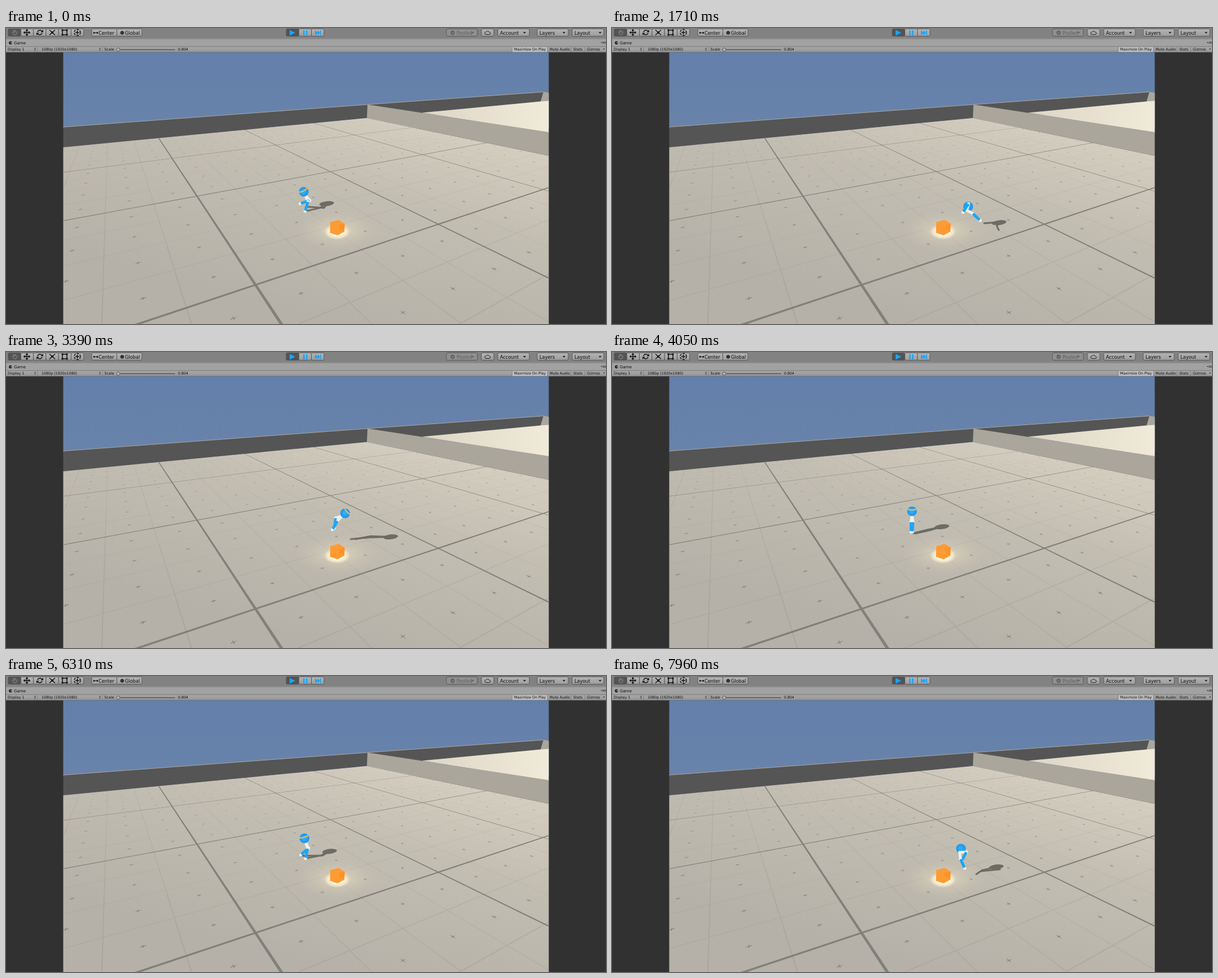
Recreate the animation shown at these times as an HTML page with a canvas. Size 1064 by 526 pixels, loop 8 s.

```html
<!DOCTYPE html>
<html lang="en">
<head>
<meta charset="utf-8">
<title>Jump training</title>
<style>
  html, body { margin: 0; width: 100%; height: 100%; overflow: hidden; background: #313131; }
  svg, canvas { position: absolute; left: 0; top: 0; width: 1064px; height: 526px; }
  text { font-family: "DejaVu Sans", sans-serif; fill: #0c0c0c; }
  .big { font-size: 8.25px; }
  .small { font-size: 6.35px; }
  .btn { fill: url(#btn); stroke: #4d4d4d; stroke-width: .8; }
  .btn.on { fill: #545454; }
  .btn.off { fill: #8f8f8f; }
  .ink { fill: none; stroke: #161616; stroke-width: 1.5; }
  .blue { fill: #1ba4f5; }
</style>
</head>
<body>
<svg viewBox="0 0 1064 526">
  <defs>
    <linearGradient id="btn" x2="0" y2="1"><stop stop-color="#b4b4b4"/><stop offset="1" stop-color="#9d9d9d"/></linearGradient>
    <linearGradient id="strip" x2="0" y2="1"><stop stop-color="#a9a9a9"/><stop offset="1" stop-color="#959595"/></linearGradient>
    <linearGradient id="sky" x2="0" y2="1"><stop stop-color="#637fab"/><stop offset="1" stop-color="#6983aa"/></linearGradient>
    <linearGradient id="floor" gradientUnits="userSpaceOnUse" x1="690" y1="165" x2="590" y2="526">
      <stop stop-color="#d3cdbf"/><stop offset=".35" stop-color="#c3beb2"/><stop offset="1" stop-color="#b6b1a8"/>
    </linearGradient>
    <linearGradient id="room" gradientUnits="userSpaceOnUse" x1="740" y1="0" x2="962" y2="0"><stop stop-color="#ddd6c6"/><stop offset="1" stop-color="#f0ead9"/></linearGradient>
    <linearGradient id="fade" gradientUnits="userSpaceOnUse" x1="0" y1="170" x2="0" y2="480">
      <stop stop-color="#6d6a64" stop-opacity=".08"/><stop offset=".5" stop-color="#6d6a64" stop-opacity=".5"/><stop offset="1" stop-color="#6d6a64" stop-opacity=".85"/>
    </linearGradient>
    <radialGradient id="halo"><stop stop-color="#fff1c8" stop-opacity=".7"/><stop offset=".4" stop-color="#eee2c2" stop-opacity=".3"/><stop offset="1" stop-color="#d0c9b6" stop-opacity="0"/></radialGradient>
    <radialGradient id="core"><stop offset=".5" stop-color="#fff8e2"/><stop offset=".8" stop-color="#fff3d4" stop-opacity=".55"/><stop offset="1" stop-color="#fbecca" stop-opacity="0"/></radialGradient>
    <clipPath id="ground"><path d="M101.5 212 640 160 962.5 227V526H101.5Z"/></clipPath>
  </defs>

  <rect x="101.5" y="43" width="861" height="135" fill="url(#sky)"/>
  <path fill="#555" d="M101.5 176 641 136 953 114 948 131 738 151 640 160 101.5 212Z"/>
  <path fill="none" stroke="#aaa79d" d="M101.5 176 641 136 953 113.6"/>
  <path fill="#aaa69c" d="M953 113.5 962.5 115V131H948Z"/>
  <path fill="url(#room)" d="M738 150.500 948 130.500 962.500 129.500V186Z"/>
  <g clip-path="url(#ground)">
    <path fill="url(#floor)" d="M101 150H963V526H101Z"/>
    <path id="thin" fill="#8f8b83" opacity=".33"/>
    <path id="marks" fill="none" stroke="url(#fade)"/>
    <path id="thick" fill="#82807a"/>
    <ellipse cx="588" cy="360" rx="76" ry="36" fill="url(#halo)"/>
    <ellipse cx="587" cy="362" rx="23" ry="14" fill="url(#core)"/>
  </g>
  <path fill="#aaa69c" d="M641 136 962.5 185V227L640 160Z"/>
  <path fill="#ff9b33" d="M575 345 590 341 600.500 347.500 600 362 588 368.500 574.500 364Z"/>
  <path fill="#fd9229" d="M592 350 600.500 347.500 600 361 591 357Z"/>

  <rect width="1064" height="18" fill="#828282"/>
  <rect y="18" width="1064" height="15" fill="#a2a2a2"/>
  <path stroke="#767676" d="M0 19H1064"/>
  <rect y="33" width="1064" height="10" fill="url(#strip)"/>
  <path stroke="#6a6a6a" stroke-width=".8" d="M0 33H1064M0 43H1064"/>
  <g id="buttons"></g>

  <path fill="none" stroke="#8c8c8c" d="M11 8 14 12H18L20 6M13 9V4M15 8V3M17 8V4"/>
  <path class="ink" d="M32 8H42M37 3V13"/>
  <path fill="#161616" d="M37 1.500 39.500 5H34.500ZM37 14.500 39.500 11H34.500ZM30.500 8 34 5.500V10.500ZM43.500 8 40 5.500V10.500Z"/>
  <path class="ink" d="M56 7A4.500 4.500 0 0 1 64 6M64 9A4.500 4.500 0 0 1 56 10"/>
  <path fill="#161616" d="M66 3V7.500H61.500ZM54 13V8.500H58.500Z"/>
  <path class="ink" d="M77 3.500 87 12.500M87 3.500 77 12.500"/>
  <rect x="80" y="6" width="4" height="4" fill="#161616"/>
  <rect class="ink" x="100" y="4" width="8" height="8" stroke-width="1"/>
  <path fill="#161616" d="M98.500 2.500h3v3h-3zM106.500 2.500h3v3h-3zM98.500 10.500h3v3h-3zM106.500 10.500h3v3h-3z"/>
  <circle class="ink" cx="126.500" cy="8" r="5.500" stroke-dasharray="4 2"/>
  <path class="ink" d="M123 8H130M126.500 4.500V11.500"/>

  <path fill="#161616" d="M155 7h2v3h-2zM157 8h5v1h-5zM161 7h2v3h-2z"/>
  <circle cx="206" cy="8.500" r="3.300" fill="#333"/>
  <path class="blue" d="M503 3.500 513 8.500 503 13.500ZM527 4h2.500v9.500H527zM532 4h2.500v9.500H532zM548 4 553 8.500 548 13ZM552.500 4 557 8.500 552.500 13ZM557 4h1.500v9H557z"/>
  <circle cx="792" cy="8.500" r="3.800" fill="#616161"/>
  <path fill="none" stroke="#a0a0a0" d="M790 8.500 791.500 10 794 7"/>
  <path fill="none" stroke="#222" d="M851 11.500H857A2 2 0 0 0 857 7.500A3 3 0 0 0 851.500 7A2.200 2.200 0 0 0 851 11.500Z"/>
  <path fill="#202020" d="M917 7h5l-2.500 3zM987 7h5l-2.500 3zM1051 7h5l-2.500 3zM1059 36.500h3l-1.500 2zM1055 25h2.500l-1.200 2z"/>
  <path fill="#606060" d="M825 7h5l-2.500 3z"/>
  <path fill="#333" d="M50 37l1.500-2 1.500 2zM50 38.500l1.500 2 1.500-2zM165 37l1.500-2 1.500 2zM165 38.500l1.500 2 1.500-2z"/>
  <path stroke="#222" stroke-width=".8" d="M1058 25H1064M1058 27H1064"/>
  <circle cx="8" cy="26.300" r="2.900" fill="#222"/><path fill="#a2a2a2" d="M8 25.500h3.500v1.500H8z"/>
  <path stroke="#555" stroke-width="1.600" d="M198 38.500H300"/>
  <circle cx="199" cy="38.500" r="3" fill="#b4b4b4" stroke="#444" stroke-width=".8"/>
  <path stroke="#777" stroke-width=".7" d="M56 33.500V43M171 33.500V43M897.500 33.500V43M960.500 33.500V43M1002 33.500V43M1026 33.500V43"/>
  <rect x="898" y="33.800" width="62" height="8.800" fill="#bebebe"/>

  <text x="14" y="29" font-size="7.1">Game</text>
  <g class="big">
    <text x="164" y="11.500">Center</text><text x="211" y="11.500">Global</text>
    <text x="799" y="11.500" style="fill:#5e5e5e">Pooled</text>
    <text x="876" y="11.500">Account</text><text x="946" y="11.500">Layers</text><text x="1008" y="11.500">Layout</text>
  </g>
  <g class="small">
    <text x="3" y="40.300">Display 1</text><text x="63" y="40.300">1080p (1920x1080)</text>
    <text x="174.500" y="40.300">Scale</text><text x="305" y="40.300">0.804</text>
    <text x="901" y="40.300">Maximize On Play</text><text x="964" y="40.300">Mute Audio</text>
    <text x="1006" y="40.300">Stats</text><text x="1030" y="40.300">Gizmos</text>
  </g>
</svg>
<canvas id="stage" width="1064" height="526"></canvas>

<script>
const $ = id => document.getElementById(id);

// A run of joined buttons of equal width
function buttons(x, width, count = 1, state = '') {
  for (let i = 0; i < count; i++) $('buttons').insertAdjacentHTML('beforeend',
    `<rect class="btn ${i ? '' : state}" x="${x + i * width}" y="1.5" width="${width}" height="13" rx="2"/>`);
}
$('buttons').innerHTML = '';
const svgButtons = document.createElementNS('http://www.w3.org/2000/svg', 'g');
$('buttons').append(svgButtons);
buttons(4, 22.3, 6, 'on');
buttons(152, 44.5, 2);
buttons(497, 22.3, 3, 'on');
buttons(781, 55, 1, 'off');
buttons(843, 22);
buttons(872, 56);
buttons(942, 55);
buttons(1004, 56);

// Floor plane (u, v) to screen
const depth = (u, v) => 1 + .3727 * u + .6732 * v;
function project(u, v) {
  const w = depth(u, v);
  return [(442.5 + 609.7 * u + 124.2 * v) / w, (456.5 + 22.2 * u + 43.4 * v) / w].map(n => n.toFixed(2)).join(' ');
}
const quad = (u0, v0, u1, v1) =>
  `M${project(u0, v0)}L${project(u1, v0)} ${project(u1, v1)} ${project(u0, v1)}Z`;

function drawFloor() {
  const d = { thin: '', thick: '', marks: '' };
  for (let i = -6; i <= 24; i++) {
    const a = i / 4, kind = i % 4 ? 'thin' : 'thick', w = i % 4 ? .0016 : .005;
    d[kind] += quad(a - w, Math.max(-.75, -(.8 + .37 * a) / .67), a + w, 3);
    if (i > -4 && i < 12) d[kind] += quad(Math.max(-1.5, -(.85 + .67 * a) / .37), a - w, 7, a + w);
    for (let j = -3; j < 12; j++) {
      const u = a + .125, v = j / 4 + .125, r = .0095;
      if (depth(u, v) > .3) d.marks += `M${project(u - r, v)}L${project(u + r, v)}M${project(u, v - r)}L${project(u, v + r)}`;
    }
  }
  for (const id in d) $(id).setAttribute('d', d[id]);
}
drawFloor();

// One attempt: ms, head x y, head tilt, then thigh and shin angle of each leg
const LOOP = 8000, ATTEMPT = 2120, LEAD = 260, STEP = 59.2;
const poses = [
  [70, 532, 283, 0, -8, 0, 8, -3],
  [260, 528, 291, -25, 40, -72, 22, -16],
  [660, 538, 277, 10, 0, -30, 10, -15],
  [900, 555, 275, 25, -8, -44, -2, -17],
  [1450, 600, 285, 50, -85, -6, -48, -34],
  [1860, 619, 307, 20, 95, -28, 8, 25],
  [1970, 636, 321, 20, 190, -35, 80, 55],
  [ATTEMPT, 650, 352, 20, 190, -30, 80, 40]
];
const lerp = (a, b, k) => a + (b - a) * k;
const clamp = n => Math.max(0, Math.min(1, n));
const rad = deg => deg * Math.PI / 180;
const along = ([x, y], deg, len) => [x + Math.sin(rad(deg)) * len, y + Math.cos(rad(deg)) * len];

function poseAt(t) {
  const next = Math.max(1, poses.findIndex(p => p[0] > t));
  const a = poses[next - 1], b = poses[next], k = clamp((t - a[0]) / (b[0] - a[0]));
  const [, x, y, ...angles] = a.map((n, i) => lerp(n, b[i], k));
  const flight = clamp((t - 900) / 550);
  return [[x, y - 13 * Math.sin(Math.PI * flight)], ...angles];
}

// Cast a point along the sun onto the sloping ground
function cast([x, y]) {
  const reach = 1.3 * Math.max(0, 323 + .36 * (x - 530) - y);
  return [x + reach, y + .52 * reach];
}

const ctx = $('stage').getContext('2d');
ctx.lineCap = ctx.lineJoin = 'round';
function line(color, width, ...pts) {
  ctx.strokeStyle = color;
  ctx.lineWidth = width;
  ctx.beginPath();
  pts.forEach(p => ctx.lineTo(...p));
  ctx.stroke();
}
function oval(color, x, y, rx, ry = rx, turn = 0) {
  ctx.fillStyle = color;
  ctx.beginPath();
  ctx.ellipse(x, y, rx, ry, turn, 0, 7);
  ctx.fill();
}

function drawHead(x, y, tilt, facing) {
  ctx.save();
  ctx.translate(x, y);
  const skin = ctx.createRadialGradient(-1, 0, 2, 0, 0, 9);
  skin.addColorStop(0, '#2bb0ff');
  skin.addColorStop(1, '#1a90e4');
  oval(skin, 0, 0, 8.6);
  ctx.clip();
  ctx.rotate(rad(tilt));
  ctx.globalAlpha = facing;
  ctx.strokeStyle = '#dcb868';
  ctx.lineWidth = 2.4;
  ctx.beginPath();
  ctx.ellipse(0, -5 - 2 * rad(tilt), 8.5, 2.6, 0, 0, Math.PI);
  ctx.stroke();
  ctx.restore();
}

function draw(t) {
  const [head, tilt, ...angles] = poseAt(t);
  const facing = clamp((1750 - t) / 250), hip = along(head, -tilt, 7);
  const legs = [0, 2].map(i => {
    const knee = along(hip, angles[i], 12);
    return [knee, along(knee, angles[i + 1], 18)];
  });
  const thighs = () => legs.forEach(([knee]) => line('#f1efeb', 4.8, hip, knee));

  ctx.clearRect(0, 0, 1064, 526);
  legs.forEach(leg => line('#6e6b65', 3, ...[head, ...leg].map(cast)));
  oval('#6e6b65', ...cast(head), 13, 4.3, -.12);

  if (facing) thighs();
  drawHead(...head, tilt, facing);
  if (!facing) thighs();
  legs.forEach(([knee, foot]) => {
    const at = k => knee.map((n, i) => lerp(n, foot[i], k));
    oval('#f4f2ee', ...knee, 2.7);
    oval('#f4f2ee', ...foot, 2.7);
    line('#1da6f6', 5, at(.14), at(.8));
  });
}

const start = performance.now();
function tick() {
  const now = (performance.now() - start) % LOOP;
  const held = Math.max(0, 24 + Math.floor((now - 24) / STEP) * STEP);
  draw((held + LEAD) % ATTEMPT);
  requestAnimationFrame(tick);
}
tick();
</script>
</body>
</html>
```
